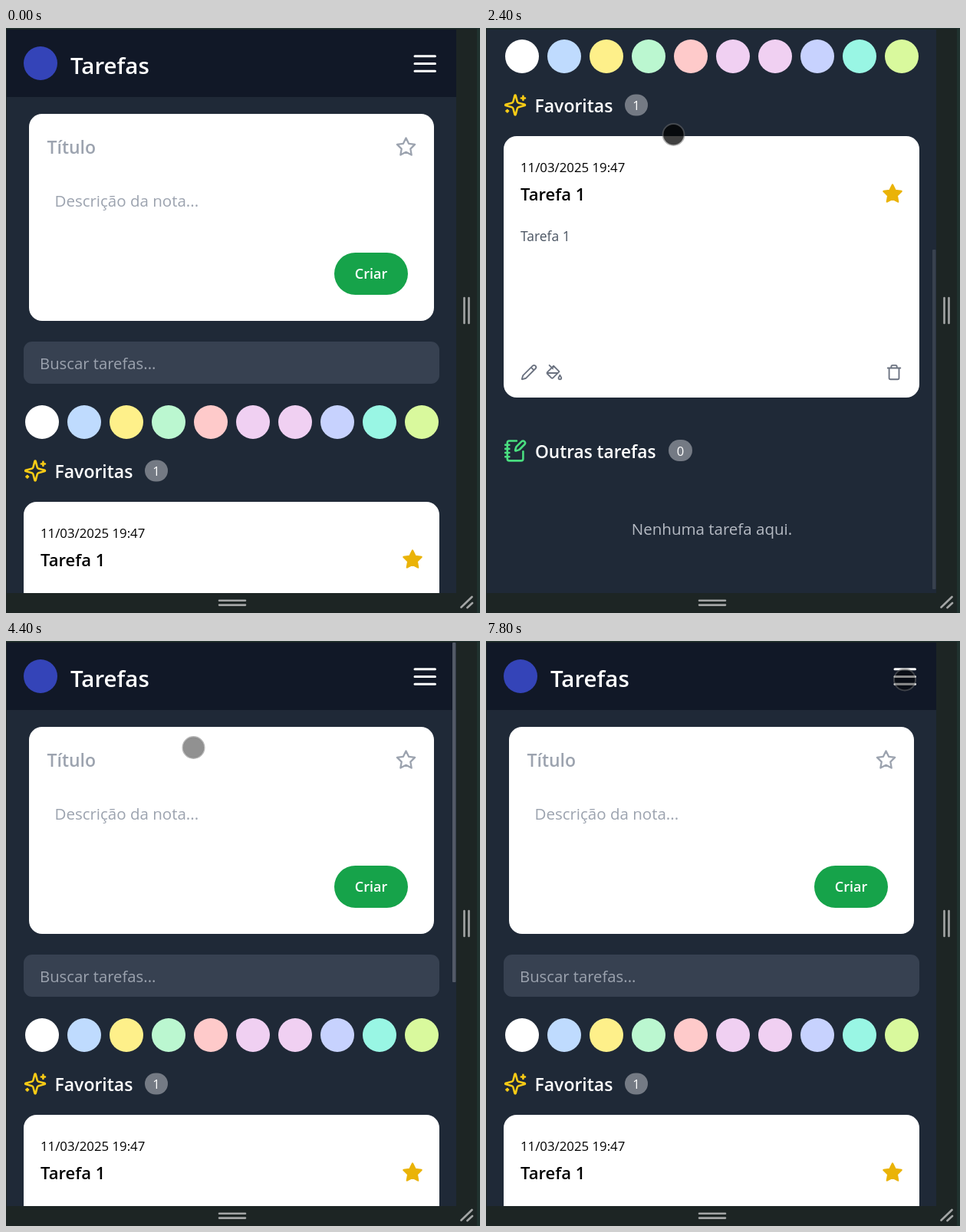
These frames come from a looping animation (618 px wide and 763 px high, 8 s). An HTML page:

```html
<!DOCTYPE html>
<html lang="pt">
<head>
<meta charset="utf-8">
<title>Tarefas</title>
<style>
  html, body { margin: 0; width: 100%; height: 100%; overflow: hidden; background: #1d2524; }
  svg { display: block; }
  text { font-family: "Open Sans", "Noto Sans", sans-serif; font-size: 20.5px; }
  .semi { font-weight: 600; }
  .white { fill: #fff; }
  .hint { fill: #9ca3af; }
  .mid { text-anchor: middle; }
  .icon { fill: none; stroke: #6b7280; stroke-width: 2; stroke-linecap: round; stroke-linejoin: round; }
  .grip { fill: none; stroke: #a3a5a5; stroke-width: 2.6; stroke-linecap: round; }
</style>
</head>
<body>
<svg width="618" height="763" viewBox="0 0 618 763">
  <defs>
    <clipPath id="view"><rect x="1" y="2" width="586" height="735"/></clipPath>
    <path id="star" d="M12 2l3.09 6.26L22 9.27l-5 4.87 1.18 6.88L12 17.77l-6.18 3.25L7 14.14 2 9.27l6.91-1.01z"/>
  </defs>

  <!-- device frame -->
  <rect width="618" height="763" fill="#1d2524"/>
  <path d="M0 .5H618" stroke="#20322f"/>
  <rect x="614" width="4" height="763" fill="#20322f"/>
  <path class="grip" d="M597.5 352v33M603.5 352v33M278 746.7h34M278 752.6h34M593.5 755.5l14-13.5M601.5 756l6.5-6"/>

  <g clip-path="url(#view)">
    <rect x="1" y="2" width="586" height="735" fill="#1f2937"/>
    <g id="page">
      <rect x="1" y="2" width="586" height="88" fill="#111827"/>
      <circle cx="45" cy="46" r="22" fill="#3444b8"/>
      <text class="semi white" x="84" y="60" style="font-size:29.5px">Tarefas</text>
      <path d="M533 36.7h26.500M533 46.500h26.500M533 56.300h26.500" stroke="#fff" stroke-width="3" stroke-linecap="round"/>

      <rect class="white" x="30" y="112" width="528" height="270" rx="17"/>
      <text class="semi hint" x="53.500" y="164" style="font-size:23px">Título</text>
      <use class="icon" href="#star" transform="translate(507.600 141.200) scale(1.16)" style="stroke:#9ca3af"/>
      <text class="hint" x="63.500" y="233">Descrição da nota...</text>
      <rect x="428" y="293" width="96" height="55" rx="27.500" fill="#16a34a"/>
      <text class="semi white mid" x="476" y="327" style="font-size:18px">Criar</text>

      <rect x="23" y="409" width="542" height="55" rx="11" fill="#374151"/>
      <text class="hint" x="44" y="445" style="font-size:20.300px">Buscar tarefas...</text>
      <g id="swatches"></g>

      <g class="icon" transform="translate(22.600 562) scale(1.29)" style="stroke:#facc15">
        <path d="M9.937 15.5A2 2 0 0 0 8.5 14.063l-6.135-1.582a.5.5 0 0 1 0-.962L8.5 9.936A2 2 0 0 0 9.937 8.5l1.582-6.135a.5.5 0 0 1 .963 0L14.063 8.5A2 2 0 0 0 15.5 9.937l6.135 1.581a.5.5 0 0 1 0 .964L15.5 14.063a2 2 0 0 0-1.437 1.437l-1.582 6.135a.5.5 0 0 1-.963 0zM20 3v4M22 5h-4M4 17v2M5 18H3"/>
      </g>
      <text class="semi white" x="63.500" y="587" style="font-size:23px">Favoritas</text>
      <rect x="181" y="563.500" width="30" height="28" rx="14" fill="#747a84"/>
      <text class="white mid" x="196" y="584" style="font-size:16.500px">1</text>

      <rect class="white" x="23" y="618" width="542" height="341" rx="17"/>
      <text x="45" y="665" style="font-size:16.800px">11/03/2025 19:47</text>
      <text class="semi" x="45" y="702" style="font-size:22px">Tarefa 1</text>
      <use class="icon" href="#star" transform="translate(516.100 679.200) scale(1.16)" style="fill:#eab308;stroke:#eab308"/>
      <text x="45" y="755" fill="#4b5563" style="font-size:17.500px">Tarefa 1</text>
      <g class="icon">
        <path transform="translate(45 915) scale(.92)" d="M21.174 6.812a1 1 0 0 0-3.986-3.987L3.842 16.174a2 2 0 0 0-.5.83l-1.321 4.352a.5.5 0 0 0 .623.622l4.353-1.32a2 2 0 0 0 .83-.497zM15 5l4 4"/>
        <path transform="translate(78 915) scale(.92)" d="M19 11l-8-8-8.6 8.6a2 2 0 0 0 0 2.8l5.2 5.2c.8.8 2 .8 2.8 0L19 11ZM5 2l5 5M2 13h15M22 20a2 2 0 1 1-4 0c0-1.6 1.7-2.4 2-4 .3 1.6 2 2.4 2 4Z"/>
        <path transform="translate(521 915) scale(.92)" d="M3 6h18M19 6v14c0 1-1 2-2 2H7c-1 0-2-1-2-2V6M8 6V4c0-1 1-2 2-2h4c1 0 2 1 2 2v2"/>
      </g>

      <g class="icon" transform="translate(22.600 1013) scale(1.29)" style="stroke:#4ade80">
        <path d="M13.4 2H6a2 2 0 0 0-2 2v16a2 2 0 0 0 2 2h12a2 2 0 0 0 2-2v-7.4M2 6h4M2 10h4M2 14h4M2 18h4M21.378 5.626a1 1 0 1 0-3.004-3.004l-5.01 5.012a2 2 0 0 0-.506.854l-.837 2.87a.5.5 0 0 0 .62.62l2.87-.837a2 2 0 0 0 .854-.506z"/>
      </g>
      <text class="semi white" x="64" y="1038" style="font-size:22.700px">Outras tarefas</text>
      <rect x="238" y="1014" width="31" height="28" rx="14" fill="#747a84"/>
      <text class="white mid" x="253.500" y="1035" style="font-size:16.500px">0</text>
      <text class="mid" x="294.500" y="1138" fill="#b6bbc4">Nenhuma tarefa aqui.</text>
    </g>
    <rect id="bar" x="582" width="4.500" height="443" rx="1" fill="#535a67"/>
    <g id="touch">
      <circle id="dot" r="13.500"/>
      <circle r="14" fill="none" stroke="#6e6e6e" stroke-opacity=".5" stroke-width="2"/>
    </g>
  </g>
</svg>
<script>
const LOOP = 8000, STEP = 100;
const $ = id => document.getElementById(id);

const colors = ['#fff', '#bfdbfe', '#fef08a', '#bbf7d0', '#fecaca',
  '#f0d0f2', '#f0d0f2', '#c7d2fe', '#99f6e4', '#d9f99d'];
$('swatches').innerHTML = colors
  .map((c, i) => `<circle cx="${47 + 55 * i}" cy="514" r="22" fill="${c}"/>`).join('');

// [time, scroll offset]
const scrollKeys = [[1300, 0], [1400, 20], [1500, 210], [1600, 412], [1700, 448], [1800, 469],
  [1900, 477], [3600, 477], [3700, 438], [3800, 300], [3900, 150], [4000, 75], [4100, 75],
  [4200, 59], [4300, 15], [4400, 0]];
// [time, opacity]
const barKeys = [[1300, 0], [1400, 1], [2300, 1], [2400, .5], [2500, .5], [2600, 0],
  [3600, 0], [3700, 1], [4800, 1], [4900, .5], [5000, 0]];
// [time, x, y, darkness]
const touchKeys = [[800, 556, 250, .7], [1000, 440, 205, .43], [1200, 290, 150, .43],
  [1300, 244.5, 138.5, .43], [1500, 244.5, 139, .43], [1600, 244.5, 139, .75],
  [3800, 244.5, 139, .75], [3900, 244.5, 139, .43], [4600, 244.5, 139, .43],
  [4800, 365, 115, .43], [5000, 461, 87, .6], [5100, 461, 87, .6], [5300, 530, 53, .4],
  [5400, 549.5, 44, .15], [5900, 549.5, 44, .15], [6100, 546, 50.5, .45]];

function at(keys, t) {
  const n = keys.findIndex(k => k[0] > t);
  if (n < 0) return keys.at(-1).slice(1);
  if (n === 0) return keys[0].slice(1);
  const a = keys[n - 1], b = keys[n], f = (t - a[0]) / (b[0] - a[0]);
  return a.slice(1).map((v, i) => v + (b[i + 1] - v) * f);
}

function draw(now) {
  const t = Math.floor(now % LOOP / STEP) * STEP;
  const [scroll] = at(scrollKeys, t);
  const [x, y, dark] = at(touchKeys, t);
  $('page').setAttribute('transform', `translate(0 ${-Math.round(scroll)})`);
  $('bar').setAttribute('y', Math.round(2 + scroll * .602));
  $('bar').setAttribute('opacity', at(barKeys, t)[0]);
  $('touch').setAttribute('transform', `translate(${x} ${y})`);
  $('touch').setAttribute('visibility', t < 800 ? 'hidden' : 'visible');
  $('dot').setAttribute('fill-opacity', dark);
  requestAnimationFrame(draw);
}
requestAnimationFrame(draw);
</script>
</body>
</html>
```
